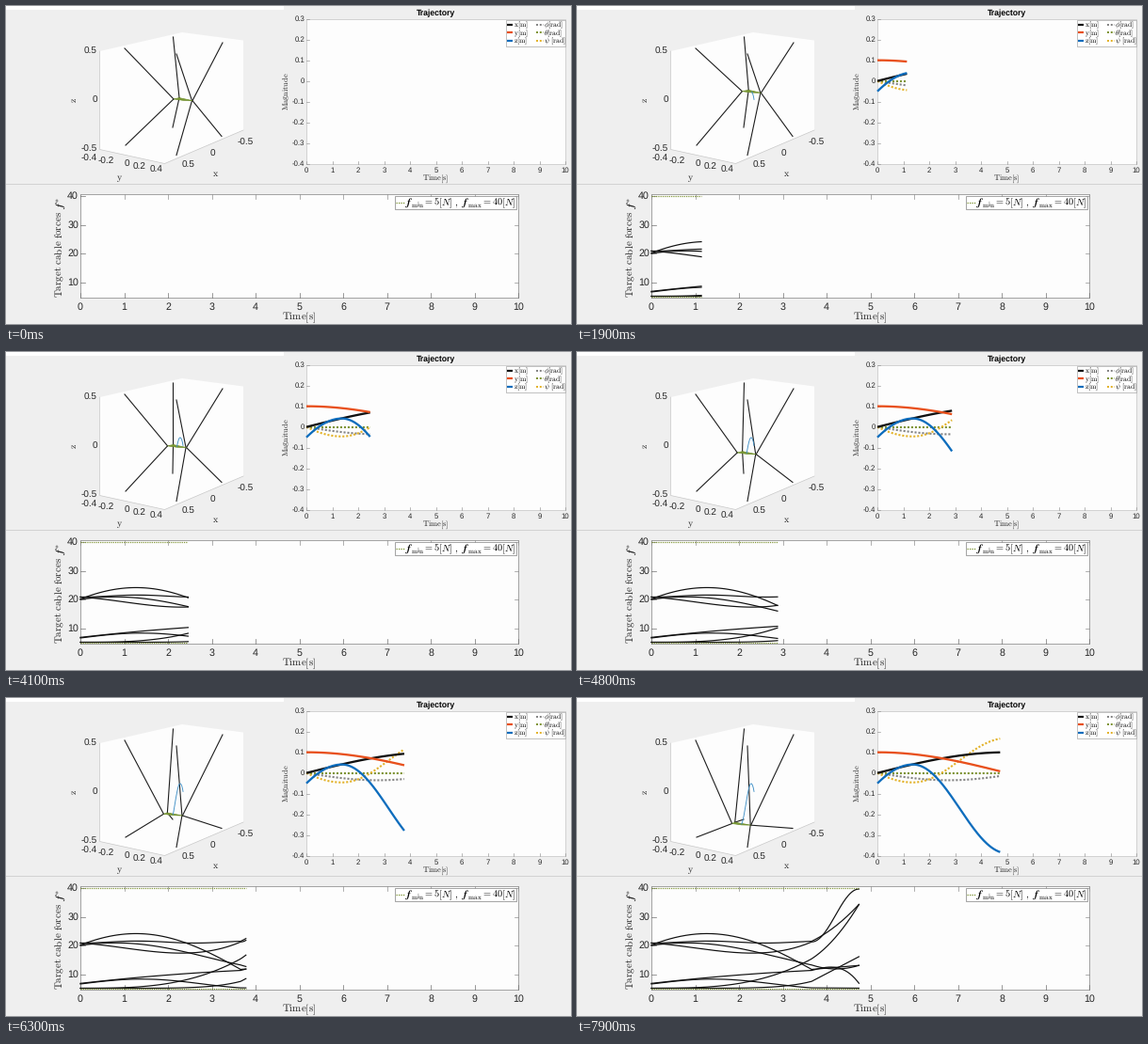
Write a matplotlib script that moves like this. It is 600 px wide and 338 px high and loops after 8 s.

```python
import numpy as np
import matplotlib.pyplot as plt
from matplotlib.animation import FuncAnimation

W, H, DPI = 600, 338, 100
FRAMES, STEP, DT = 80, 100, 0.06
PX = 72 / DPI

plt.rcParams.update({"font.family": "Liberation Sans", "mathtext.fontset": "cm",
                     "text.hinting": "none"})

BLACK, RED, BLUE = "#101010", "#e8501c", "#0e6dbd"
GRAY, OLIVE, GOLD = "#858585", "#7f9436", "#e3b32c"
INK = "#262626"
DOTS = (0, (1, 0.9))

fig = plt.figure(figsize=(W / DPI, H / DPI), dpi=DPI, facecolor="#efefef")
ax = fig.add_axes([0, 0, 1, 1])
ax.set_xlim(0, W)
ax.set_ylim(H, 0)
ax.axis("off")


def line(xs=(), ys=(), color=INK, w=1.0, z=3, **kw):
    return ax.plot(xs, ys, color=color, lw=w * PX, zorder=z, **kw)[0]


def box(x0, y0, x1, y1, face, edge="none", w=0.7, z=1):
    ax.add_patch(plt.Rectangle((x0, y0), x1 - x0, y1 - y0, fc=face, ec=edge,
                               lw=w * PX, zorder=z))


def label(x, y, s, size, ha="center", va="center", color=INK, **kw):
    ax.text(x, y, s, fontsize=size * PX, ha=ha, va=va, color=color, zorder=8, **kw)


def text_from(x, y, s, size, **kw):
    label(x, y, s, size, ha="left", va="baseline", rotation_mode="anchor", **kw)


def bold_f(x, y, size, **kw):
    text_from(x, y, r"$\mathbfit{f}$", size, math_fontfamily="stix", **kw)


def rm(s):
    return r"$\mathrm{" + s.replace(" ", r"\ ") + "}$"


# ---------- motion ----------
PEAK, SWITCH = 1.37, 3.66  # top of the path; moment the slack cables change


def pose(t):
    x = 0.1 * np.sin(np.pi * t / 10)
    y = 0.1 * np.cos(np.pi * t / 10)
    rate = np.where(t < PEAK, 0.7, 0.865)
    z = 0.041 - 0.214 * (1 - np.cos(rate * (t - PEAK)))
    roll = -0.035 * np.sin(np.pi * t / 5.5)
    return x, y, z, roll, 0 * t, -(z + 0.05) / 2


def cable_forces(time):
    t = np.minimum(time, SWITCH)
    u = np.maximum(time - SWITCH, 0)
    return [
        9.7 + 14.5 * np.cos(0.6 * (t - 1.27)) + 1.3 * u,
        21.25 - 0.35 * np.cos(2.4 * t) + 7.4 * u + 4.2 * u**2,
        15.95 + 5 * np.cos(0.75 * (t - 0.8)) - 5 * u + 4.5 * u**2,
        20.9 - 0.93 * t - 1.18 * t**2 + 0.4 * t**3 + 9.25 * (1 - np.cos(2.9 * u)),
        6.8 + 1.75 * t - 0.14 * t**2 + 4 * u - 7 * u**3,
        6.65 + 1.65 * np.cos(1.15 * (t - 1.4)) - 0.1 * u,
        5.1 + 0.21 * t**3 + 10 * u + 7 * u**2,
        5.1 + 0.001 * t**6 + 8 * u,
    ]


# ---------- trajectory panel ----------
def top_xy(t, v):
    return 319 + 27.5 * t, 79.7 - 220.3 * v


def low_xy(t, v):
    return 79 + 46.5 * t, 324 - 3.04 * v


box(0, 0, 295, 4, "white")
line([0, W], [188.5, 188.5], "#d2d2d2")

box(319, 13.5, 594, 167.5, "#fdfdfd", "#c4c4c4")
label(456.5, 7.8, "Trajectory", 8.6, weight="bold", color="black")
for k in range(11):
    x, _ = top_xy(k, 0)
    line([x, x], [167.5, 165], "#8a8a8a", 0.6)
    label(x, 175, str(k), 7.8)
for k in range(-4, 4):
    _, y = top_xy(0, k / 10)
    line([319, 321.5], [y, y], "#8a8a8a", 0.6)
    label(317, y, f"{k / 10:g}", 7.8, ha="right")
label(456.5, 184, rm("Time[s]"), 8.4)
label(298, 90.5, rm("Magnitude"), 8.3, rotation=90)

# ---------- force panel ----------
box(79, 200, 544, 309.5, "#fdfdfd", "#909090", 0.8)
for k in range(11):
    x, _ = low_xy(k, 0)
    line([x, x], [309.5, 305], "#707070", 0.7)
    line([x, x], [200, 204.5], "#909090", 0.7)
    label(x, 320, str(k), 10.6)
for v in range(10, 50, 10):
    _, y = low_xy(0, v)
    line([79, 83.5], [y, y], "#707070", 0.7)
    line([539.5, 544], [y, y], "#909090", 0.7)
    label(77, y, str(v), 10.6, ha="right")
label(311.5, 331, rm("Time[s]"), 11)
text_from(61, 310, rm("Target cable forces"), 11, rotation=90)
bold_f(61, 215, 11.5, rotation=90)
text_from(57, 209, "$*$", 8, rotation=90)

# ---------- legends ----------
box(531, 14.5, 594, 42.5, "white", "#9a9a9a", 0.6, z=6)
rows = [("x", BLACK, r"\phi", GRAY), ("y", RED, r"\theta", OLIVE),
        ("z", BLUE, r"\psi\ ", GOLD)]
for k, (a, ca, b, cb) in enumerate(rows):
    y = 19.5 + 8.8 * k
    line([532, 538], [y, y], ca, 2.2, 7, solid_capstyle="butt")
    line([563, 570.5], [y, y], cb, 2, 7, ls=DOTS)
    text_from(538.7, y + 2.3, rm(a + "[m]"), 7.7, color="black")
    text_from(571, y + 2.3, rf"${b}\mathrm{{[rad]}}$", 7.7, color="black")

box(413, 202, 542, 215.5, "white", "#808080", z=6)
line([414, 422.5], [209, 209], OLIVE, 1.3, 7, ls=DOTS)
for x, s in ((423.5, r"min}}=5[N]\ ,"), (484, "max}}=40[N]")):
    bold_f(x, 212, 11, color="black")
    text_from(x + 6.3, 212, r"${}_{\mathrm{" + s.replace("}}", "}}", 1) + "$", 10.3,
              color="black")

# ---------- robot view ----------
ROOM = [(99.5, 48), (187, 28), (252, 36.5), (252, 132), (168.5, 167.5), (99.5, 152.5)]
ax.add_patch(plt.Polygon(ROOM, fc="#fdfdfd", ec="none", zorder=1))
line(*zip(ROOM[0], ROOM[5], ROOM[4], ROOM[3]), color="#c8c8c8", w=0.7)
for k in range(3):
    label(97, 48.3 + 52.2 * k, f"{0.5 - 0.5 * k:g}", 10, ha="right")
    label(187 + 29.3 * k, 169.3 - 12 * k, f"{0.5 - 0.5 * k:g}", 10, ha="left")
for k in range(5):
    label(97 + 17.3 * k, 162 + 3.2 * k, f"{0.2 * (k - 2):g}", 10, ha="right")
label(121, 184, rm("y"), 10)
label(222.5, 178.5, rm("x"), 10)
label(72, 100, rm("z"), 10, rotation=90)


def project(x, y, z):
    return 180 - 60 * x + 80 * y, 92.4 + 25 * x + 19 * y - 102 * z


# each pair of anchors hangs on one corner of the platform
ANCHORS = [((126, 45), (127, 148)), ((177.5, 33), (177, 129)),
           ((230, 39), (229, 138.5)), ((181, 51), (181, 158.5))]
cables = [[line(color="#1c1c1c", w=1.1, z=4) for _ in pair] for pair in ANCHORS]
plate = ax.add_patch(plt.Polygon([(0, 0)] * 4, fc="#7c9a36", ec="#6f8e2c",
                                 lw=0.7 * PX, zorder=5))
trail = line(color="#3f8fc6", w=0.9, z=5)

curves = [line(color=c, w=2.3, z=4, solid_capstyle="butt") for c in (BLACK, RED, BLUE)]
curves += [line(color=c, w=2.1, z=3.5, ls=DOTS) for c in (GRAY, OLIVE, GOLD)]
loads = [line(color=BLACK, w=1.2, z=4) for _ in range(8)]
limits = [line(color=OLIVE, w=1.2, z=5, ls=DOTS) for _ in range(2)]


def draw(i):
    t = np.linspace(0, DT * i, 2 * i + 1)
    state = pose(t)

    px, py = project(*state[:3])
    trail.set_data(px, py)
    cx, cy, yaw = px[-1], py[-1], state[5][-1]
    left, right = (cx - 10, cy - 0.5), (cx + 10, cy + 1.2)
    back, front = (cx - 4 - 18 * yaw, cy - 1.8), (cx + 9.5, cy + 1.2)
    for pair, ends, hub in zip(cables, ANCHORS, (left, back, right, front)):
        for ln, end in zip(pair, ends):
            ln.set_data(*zip(end, hub))
    plate.set_xy([left, back, right, (cx, cy + 0.9)])

    for ln, v in zip(curves, state):
        ln.set_data(*top_xy(t, v))
    for ln, v in zip(loads, cable_forces(t)):
        ln.set_data(*low_xy(t, v))
    for ln, v in zip(limits, (5, 40)):
        ln.set_data(*low_xy(t, v + 0 * t))
    for ln in curves + loads + limits + [trail]:
        ln.set_visible(i > 0)
    return []


anim = FuncAnimation(fig, draw, frames=FRAMES, interval=STEP, repeat=True,
                     repeat_delay=0, blit=False)
plt.show()
```
